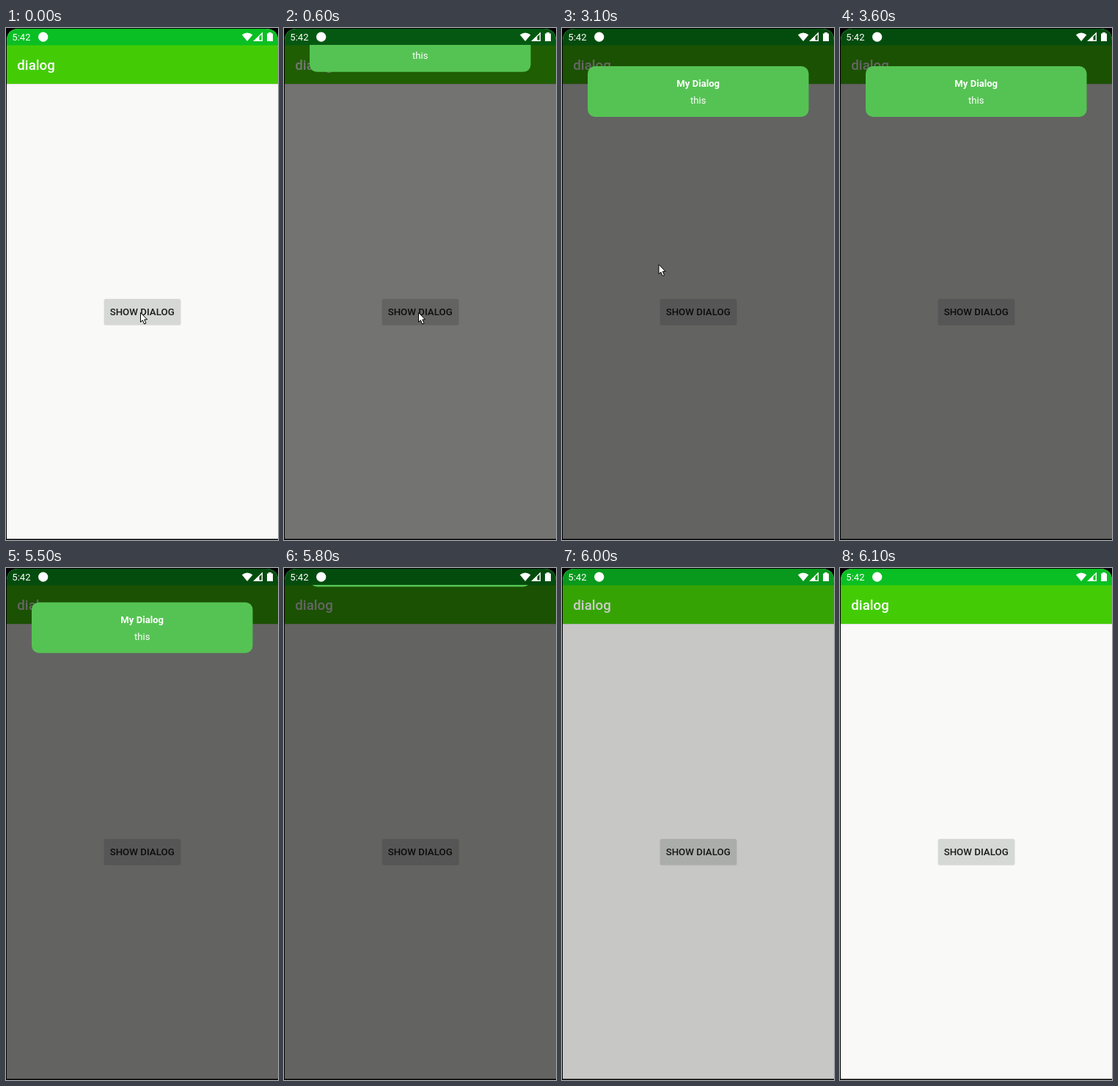
Recreate the animation shown at these times as an HTML page. Size 371 by 697 pixels, loop 6700 ms.

```html
<!DOCTYPE html>
<html lang="en">
<head>
<meta charset="utf-8">
<title>Dialog demo</title>
<style>
  html, body { margin: 0; width: 100%; height: 100%; overflow: hidden; background: #000; }
  svg { display: block; width: 100vw; height: 100vh; }
  text { font-family: Roboto, sans-serif; font-size: 13.1px; }
  .mid { text-anchor: middle; }
</style>
</head>
<body>
<svg viewBox="0 0 371 697">
  <defs>
    <clipPath id="screen"><path d="M1 696V18Q1 1 18 1H354Q371 1 371 18V696Z"/></clipPath>
    <clipPath id="below"><rect y="23" width="371" height="674"/></clipPath>
  </defs>
  <rect width="371" height="697" fill="#000"/>
  <g clip-path="url(#screen)">
    <rect x="1" y="1" width="370" height="694.5" fill="#f9f9f7"/>
    <rect x="1" y="76" width="370" height="1" fill="#000" opacity=".1"/>
    <rect x="1" y="23" width="370" height="53" fill="#43cc05"/>
    <rect x="1" y="1" width="370" height="22.5" fill="#0abf24"/>
    <text x="15.3" y="57" fill="#fff" font-weight="500" style="font-size:18.7px">dialog</text>

    <rect x="133.5" y="369.5" width="105" height="35.3" rx="2.5" fill="#000" opacity=".12"/>
    <rect x="134" y="368.7" width="104" height="35" rx="2" fill="#d6d8d5"/>
    <text class="mid" x="185.7" y="391" fill="#1a1c1a" font-weight="500" style="font-size:13.3px">SHOW DIALOG</text>

    <rect id="dim" width="371" height="697" fill="#000" opacity="0"/>

    <g clip-path="url(#below)">
      <g id="dialog" fill="#fff">
        <rect x="35" y="52" width="301.5" height="69" rx="10" fill="#55c353"/>
        <text class="mid" x="185.7" y="80.2" font-weight="700">My Dialog</text>
        <text class="mid" x="185.7" y="103.2">this</text>
      </g>
    </g>

    <g fill="#fff">
      <text x="8.3" y="17.2">5:42</text>
      <circle cx="50.7" cy="12.2" r="6.6"/>
      <path d="M321.8 9.3Q329 3.7 336.4 9.3L329.1 18Z"/>
      <path d="M337 18L350 5.5V18ZM345.5 11.7V16.6H348.6V8.8Z" fill-rule="evenodd"/>
      <path d="M356 7.5H358V6H362V7.5H364V18H356Z"/>
    </g>
  </g>
  <path id="cursor" d="M.5 .6V13.4L3.4 10.7L5.6 16L8 15L5.8 9.9H9.6Z" fill="#fff" stroke="#000" stroke-width="1"/>
</svg>
<script>
  const LOOP = 6700, TICK = 100, SLIDE = 400, HIDDEN = -98, DIM = 0.6;
  const ENTER = 432, EXIT = 5440, FADE_OUT = 5800;
  // time, x, y of each pointer position; it leaves the stage at POINTER_END
  const POINTER = [[0, 183, 387], [3100, 131.5, 321.5], [3200, 10, 150], [3300, 28, 22], [3500, 13, 9]];
  const POINTER_END = 3600;

  const $ = id => document.getElementById(id);
  const dim = $("dim"), dialog = $("dialog"), cursor = $("cursor");
  const progress = (t, start, span) => Math.min(1, Math.max(0, (t - start) / span));
  const ease = p => (1 - Math.cos(Math.PI * p)) / 2;

  function draw(t) {
    const shown = ease(progress(t, ENTER, SLIDE)) - ease(progress(t, EXIT, SLIDE));
    dialog.setAttribute("transform", `translate(0 ${HIDDEN * (1 - shown)})`);
    dialog.setAttribute("visibility", shown > 0 ? "visible" : "hidden");

    const shade = progress(t, ENTER, 187) - progress(t, FADE_OUT, 300);
    dim.setAttribute("opacity", DIM * shade);

    const [, x, y] = POINTER.filter(p => p[0] <= t).pop();
    cursor.setAttribute("transform", `translate(${x} ${y})`);
    cursor.setAttribute("visibility", t < POINTER_END ? "visible" : "hidden");
  }

  const begin = performance.now();
  function loop() {
    const t = (performance.now() - begin) % LOOP;
    draw(Math.floor(t / TICK) * TICK);
    requestAnimationFrame(loop);
  }
  loop();
</script>
</body>
</html>
```
